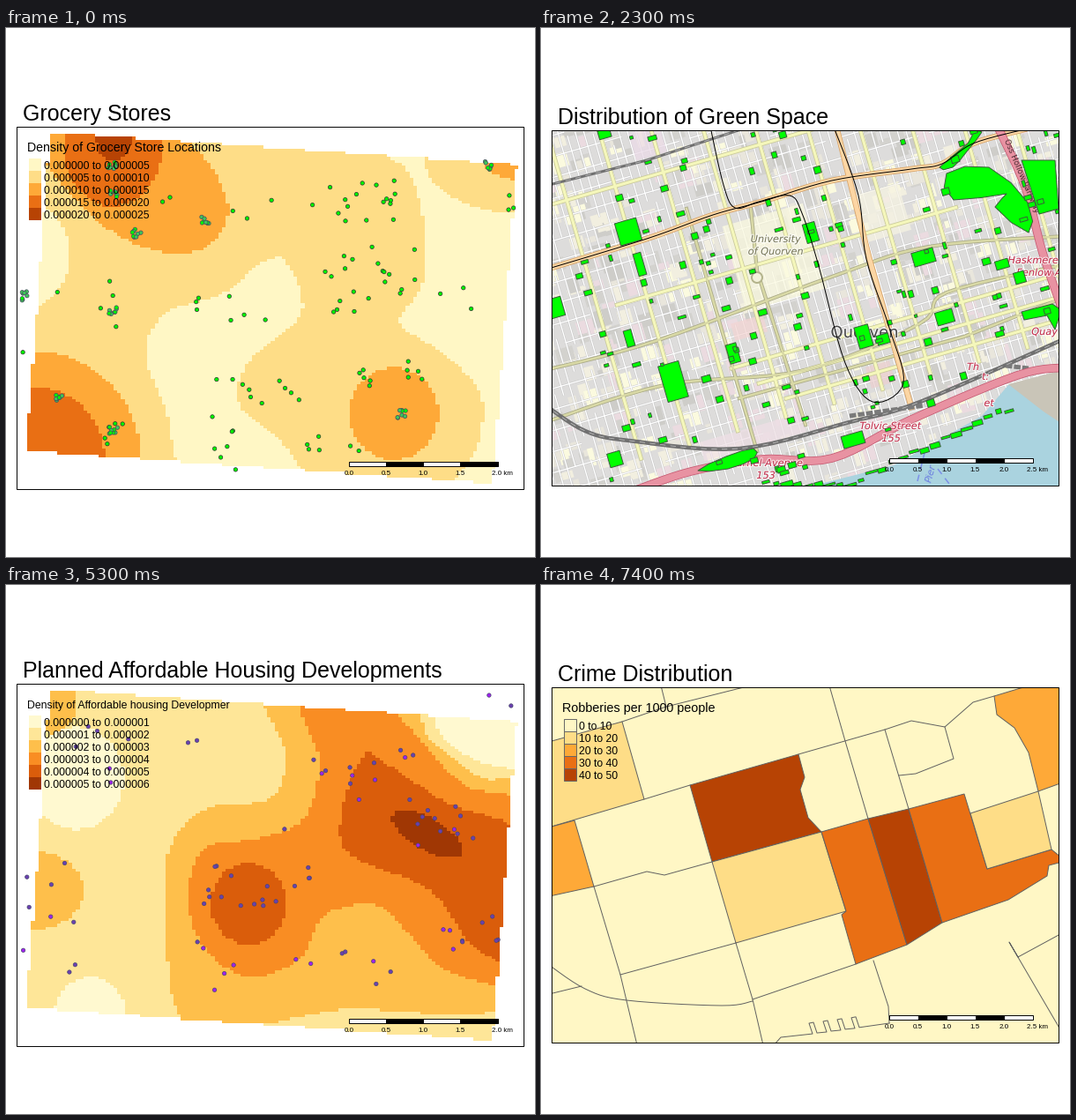
A matplotlib script that plays this animation: 600 px wide and 600 px high, repeating every 8000 ms.

```python
import math
import numpy as np
import matplotlib.pyplot as plt
import matplotlib.patheffects as pe
from matplotlib.animation import FuncAnimation
from matplotlib.collections import LineCollection, PolyCollection
from matplotlib.colors import ListedColormap
from matplotlib.path import Path

SIZE, PT, HAIR = 600, 0.72, 0.7  # stage in pixels, points per pixel, thin line
LEFT, RIGHT = 12, 587
COS, SIN = math.cos(0.28), math.sin(0.28)  # tilt of the street grid
SANS, LABEL = "Liberation Sans", "DejaVu Sans"
WARM5 = ["#FFF7C5", "#FEDD87", "#FEA938", "#E96F14", "#B74304"]
WARM6 = ["#FFF9D0", "#FEE698", "#FEBF4B", "#F98D23", "#DA5D0B", "#A03704"]

fig = plt.figure(figsize=(6, 6), dpi=100, facecolor="white")
scenes = []


def pts(*nums):
    return np.array(nums, float).reshape(-1, 2)


def spline(*nums, closed=True, n=8):
    """Catmull-Rom curve through the points."""
    p = pts(*nums)
    p = np.vstack([p[-1:], p, p[:2]] if closed else [p[:1], p, p[-1:]])
    a, b, c, d = p[:-3], p[1:-2], p[2:-1], p[3:]
    t = np.linspace(0, 1, n)[:, None, None]
    q = 2 * b + (c - a) * t + (2 * a - 5 * b + 4 * c - d) * t**2 + (3 * b - a - 3 * c + d) * t**3
    return q.transpose(1, 0, 2).reshape(-1, 2) / 2


def ellipse(x, y, rx, ry, turn=0):
    a = np.linspace(0, 2 * math.pi, 60)
    u, v = rx * np.cos(a), ry * np.sin(a)
    c, s = math.cos(turn), math.sin(turn)
    return np.column_stack([x + u * c - v * s, y + u * s + v * c])


def text(ax, x, y, s, size, **kw):
    kw = {"family": SANS, "color": "black", "va": "baseline", "clip_on": True, "zorder": 20, **kw}
    ax.text(x, y, s, fontsize=size * PT, **kw)


def panel(title, top, bottom):
    """Title, black frame, and a clipped map area measured in stage pixels."""
    page = fig.add_axes([0, 0, 1, 1], zorder=2)
    area = fig.add_axes([LEFT / SIZE, 1 - (bottom + 1) / SIZE,
                         (RIGHT - LEFT + 1) / SIZE, (bottom - top + 1) / SIZE], zorder=1)
    page.set(xlim=(0, SIZE), ylim=(SIZE, 0))
    area.set(xlim=(LEFT, RIGHT + 1), ylim=(bottom + 1, top))
    for ax in (page, area):
        ax.axis("off")
    page.add_patch(plt.Rectangle((LEFT, top), RIGHT - LEFT, bottom - top,
                                 fill=False, lw=HAIR, ec="black"))
    text(page, 19, top - 7, title, 25)
    scenes.append((page, area))
    return area


def legend(ax, title, size, top, colors, labels, edge="none"):
    text(ax, 24, top - 8, title, size)
    for i, (color, label) in enumerate(zip(colors, labels)):
        y = top + 14 * i
        ax.add_patch(plt.Rectangle((26, y), 14, 14, fc=color, ec=edge, lw=HAIR, zorder=19))
        text(ax, 43, y + 12.5, label, 12.3)


def scale_bar(ax, x0, y, parts):
    step = (557.5 - x0) / parts
    for i in range(parts):
        ax.add_patch(plt.Rectangle((x0 + i * step, y), step, 5, lw=HAIR, ec="black",
                                   fc="black" if i % 2 else "white", zorder=19))
        text(ax, x0 + i * step, y + 15, f"{i / 2:.1f}", 8, ha="center")
    text(ax, 551, y + 15, f"{parts / 2:.1f} km", 8)


def density(ax, colors, zones):
    """Blocky raster: zones of (class, outline) painted over class 1."""
    dx, dy, nx, ny = 4.25, 3.3, 131, 121
    gx, gy = np.meshgrid(24 + dx * (np.arange(nx) + 0.5), 121 + dy * (np.arange(ny) + 0.5))
    cells = np.column_stack([gx.ravel(), gy.ravel()])
    grid = np.ones(len(cells))
    for level, outline in zones:
        grid[Path(outline).contains_points(cells)] = level
    extent = Path(pts(50, 119, 579, 156, 552, 517, 23, 480))
    grid[~extent.contains_points(cells)] = np.nan
    ax.imshow(grid.reshape(ny, nx), cmap=ListedColormap(colors), vmin=-0.5,
              vmax=len(colors) - 0.5, interpolation="nearest", aspect="auto",
              extent=(24, 24 + dx * nx, 121 + dy * ny, 121))


def dots(ax, rng, groups, colors, edge):
    """Random dots in groups of (x, y, half width, half height, count)."""
    for x, y, w, h, n in groups:
        p = rng.uniform(-1, 1, (n, 2)) * (w, h) + (x, y)
        ax.scatter(*p.T, s=(4.4 * PT) ** 2, c=rng.choice(colors, n), ec=edge,
                   lw=0.7 * PT, zorder=15)


def bins(count, step):
    return [f"{i * step / 1e6:.6f} to {(i + 1) * step / 1e6:.6f}" for i in range(count)]


def grocery():
    ax = panel("Grocery Stores", 112, 523)
    density(ax, WARM5, [
        (0, ellipse(15, 258, 57, 64)),
        (0, spline(318, 266, 335, 325, 276, 378, 265, 428, 318, 476, 330, 520, 212, 520,
                   180, 430, 158, 370, 181, 324, 245, 302, 290, 267)),
        (0, spline(424, 130, 458, 166, 474, 225, 472, 290, 446, 334, 482, 361, 536, 410,
                   536, 470, 508, 530, 600, 540, 600, 130)),
        (1, ellipse(580, 145, 107, 66)),
        (2, ellipse(590, 150, 50, 24)),
        (2, spline(40, 130, 95, 212, 165, 252, 225, 250, 252, 207, 222, 145, 150, 100)),
        (3, ellipse(121, 136, 56, 67)),
        (4, ellipse(122, 126, 20, 26)),
        (2, ellipse(30, 490, 123, 123)),
        (3, ellipse(30, 490, 82, 83)),
        (2, ellipse(439.5, 438, 51, 52)),
    ])
    rng = np.random.default_rng(4)
    dots(ax, rng, [
        (385, 195, 58, 26, 17), (395, 285, 42, 40, 17), (490, 285, 50, 40, 7),
        (574, 190, 12, 60, 3), (255, 326, 45, 28, 7), (290, 408, 52, 22, 10),
        (235, 468, 32, 35, 7), (375, 462, 38, 18, 6), (425, 392, 55, 16, 10),
        (240, 180, 65, 48, 5), (70, 340, 55, 55, 6), (110, 460, 28, 15, 5),
    ], ["#00FF00"], "#303030")
    hubs = [(120, 155), (121, 187), (148, 233), (226, 217), (546, 156), (19, 304),
            (121, 322), (61, 419), (122, 455), (449, 438)]
    dots(ax, rng, [(x, y, 5, 5, 8) for x, y in hubs], ["#00FF00", "#3CC85A"], "#4A4A60")
    legend(ax, "Density of Grocery Store Locations", 14.1, 148, WARM5, bins(5, 5))
    scale_bar(ax, 389, 492, 4)


def housing():
    ax = panel("Planned Affordable Housing Developments", 112, 523)
    density(ax, WARM6, [
        (0, ellipse(80, 220, 54, 58)),
        (0, ellipse(95, 490, 41, 45)),
        (0, ellipse(590, 145, 105, 65)),
        (2, ellipse(50, 135, 31, 34)),
        (2, ellipse(33, 347, 55, 44)),
        (2, spline(298, 120, 318, 195, 298, 243, 230, 253, 190, 290, 182, 350, 207, 500,
                   380, 482, 585, 466, 595, 240, 540, 220, 480, 175, 450, 130)),
        (3, spline(334, 126, 355, 200, 338, 266, 285, 288, 225, 300, 206, 355, 225, 412,
                   275, 445, 334, 424, 361, 375, 420, 364, 460, 400, 505, 440, 590, 440,
                   595, 260, 515, 225, 426, 135)),
        (4, ellipse(275, 362, 43, 46)),
        (4, spline(405, 195, 380, 262, 392, 308, 480, 346, 530, 410, 590, 425, 590, 290,
                   500, 248, 430, 203)),
        (5, ellipse(478, 283, 45, 18, 0.52)),
    ])
    dots(ax, np.random.default_rng(8), [
        (150, 185, 90, 40, 8), (405, 225, 58, 42, 13), (500, 280, 38, 35, 11),
        (522, 395, 38, 32, 9), (265, 350, 42, 32, 13), (355, 310, 45, 35, 5),
        (290, 430, 95, 36, 9), (50, 375, 36, 72, 9), (430, 440, 15, 15, 3), (562, 133, 16, 9, 2),
    ], ["#A020F0", "#6A3FB0", "#6A3FB0"], "#4A4A70")
    legend(ax, "Density of Affordable housing Developmer", 12.3, 148, WARM6, bins(6, 1))
    scale_bar(ax, 389, 492, 4)


def crime():
    ax = panel("Crime Distribution", 116, 519)
    ax.add_patch(plt.Rectangle((0, 100), 600, 440, fc=WARM5[0]))
    for level, p in [
        (1, pts(5, 179, 92, 155, 117, 243, 5, 276)),
        (4, pts(169, 227, 292, 192, 299, 218, 294, 232, 303, 264, 318, 280, 194, 314)),
        (2, pts(5, 276, 38, 267, 60, 342, 5, 354)),
        (1, pts(194, 314, 318, 280, 346, 370, 221, 406)),
        (3, pts(318, 280, 371, 265, 415, 408, 357, 430, 341, 374, 346, 370)),
        (4, pts(371, 265, 417, 254, 455, 383, 415, 408)),
        (3, pts(417, 254, 480, 237, 506, 322, 579, 300, 595, 313, 576, 318, 574, 330, 530, 357, 455, 383)),
        (1, pts(487, 259, 564, 234, 579, 300, 506, 322)),
        (2, pts(514, 126, 517, 147, 537, 162, 553, 190, 564, 234, 600, 221, 600, 100)),
    ]:
        ax.add_patch(plt.Polygon(p, fc=WARM5[level], ec="#606060", lw=HAIR))
    piers = [(x + dx, 514 - (x - 270) * 0.13 - dy)
             for x in range(308, 365, 16) for dx, dy in ((0, 0), (-4, 12), (1, 13), (5, 1))]
    for p in [
        pts(92, 155, 142, 138, 230, 116), pts(136, 114, 142, 138),
        pts(327, 114, 345, 177, 371, 265),
        pts(292, 192, 390, 164, 420, 154, 458, 161, 490, 133, 514, 126),
        pts(390, 164, 417, 254), pts(458, 161, 468, 197, 425, 214, 406, 216),
        pts(117, 243, 169, 227), pts(60, 342, 90, 442, 109, 522),
        pts(60, 342, 120, 325, 140, 329, 194, 314), pts(90, 442, 221, 406),
        pts(221, 406, 240, 470, 252, 522), pts(240, 470, 357, 430),
        spline(5, 428, 50, 458, 97, 471, 205, 477, 240, 472, closed=False),
        pts(5, 465, 46, 455), pts(377, 426, 394, 478, 395, 497),
        np.array([(264, 522), (272, 513), *piers, (395, 497)]),
        pts(600, 390, 541, 422, 531, 405, 600, 523),
    ]:
        ax.plot(*p.T, color="#606060", lw=HAIR)
    labels = [f"{i} to {i + 10}" for i in range(0, 50, 10)]
    legend(ax, "Robberies per 1000 people", 14.4, 152, WARM5, labels, "#666666")
    scale_bar(ax, 395, 488, 5)


def tilt(u, v):
    """Street-grid coordinates to stage pixels."""
    return 12 + u * COS + v * SIN, 273 - u * SIN + v * COS


def block(x, y, w, h):
    """Rectangle centred on a stage pixel and turned with the streets."""
    return [(x + a * w * COS + b * h * SIN, y - a * w * SIN + b * h * COS)
            for a, b in ((-.5, -.5), (.5, -.5), (.5, .5), (-.5, .5))]


def road(ax, p, color, width, casing=None, z=4, **kw):
    if casing:
        ax.plot(*p.T, color=casing, lw=(width + 1.6) * PT, zorder=z, **kw)
    ax.plot(*p.T, color=color, lw=width * PT, zorder=z + 0.1, **kw)


def broken(rng, start, end, low, high):
    """Random street stretches between two limits, with gaps."""
    while start < end:
        stop = start + rng.uniform(low, high)
        yield start, stop
        start = stop + rng.choice([0, 12, 28])


def streets(ax, rng):
    tints = ["#E9E6DC", "#F2EFE0", "#D3D2CE", "#CECDC9", "#EBDBE0", "#FBFADF"]
    yards = [block(*rng.uniform((0, 100), (600, 530)), *rng.uniform(6, 22, 2)) for _ in range(650)]
    ax.add_collection(PolyCollection(yards, fc=rng.choice(tints, 650), ec="none", zorder=1))
    lines = [[tilt(u, a), tilt(u, b)] for u in np.arange(-150, 700, 9.5)
             for a, b in broken(rng, -260, 460, 30, 130)]
    lines += [[tilt(a, v), tilt(b, v)] for v in np.arange(-260, 460, 23)
              for a, b in broken(rng, -150, 700, 40, 150)]
    ax.add_collection(LineCollection(lines, colors="#C2C2C2", lw=2.2 * PT, zorder=2))
    ax.add_collection(LineCollection(lines, colors="white", lw=1.4 * PT, zorder=2.1))
    for u in range(38, 560, 57):
        road(ax, np.array([tilt(u, -180), tilt(u, 235)]), "#F5F7BB", 3.2, "#C9C99A")
    for v in (-70, 60, 165, 190, 215):
        road(ax, np.array([tilt(v, v), tilt(v + 400, v)]), "#F5F7BB", 3.2, "#C9C99A")


def parks(ax, rng):
    shapes = [
        spline(460, 165, 508, 158, 552, 198, 553, 232, 515, 203, 528, 188, 468, 195, n=3),
        pts(545, 150, 583, 150, 587, 205, 565, 211),
        spline(452, 158, 484, 131, 490, 119, 500, 118, 483, 140, 467, 158, n=3),
        spline(178, 502, 210, 486, 241, 477, 242, 488, 212, 500, n=3),
        pts(545, 322, 580, 313, 590, 320, 583, 342, 574, 326, 548, 331),
    ]
    shapes += [block(*p) for p in [
        (99, 231, 25, 26), (112, 268, 9, 26), (150, 401, 24, 42), (366, 350, 16, 25),
        (306, 232, 14, 22), (434, 260, 25, 16), (17, 317, 16, 22), (458, 328, 20, 15),
        (218, 369, 12, 22), (100, 352, 9, 19), (354, 467, 25, 14), (84, 489, 15, 16),
        (72, 120, 14, 10), (543, 283, 12, 13), (523, 268, 15, 10), (388, 353, 14, 11)]]
    while len(shapes) < 165:
        x, y = rng.uniform((12, 116), (588, 515))
        if y < 515 - max(x - 260, 0) * 0.42 and (x < 500 or y < 350):
            shapes.append(block(x, y, rng.uniform(3, 10), rng.uniform(3, 8)))
    for x in range(255, 535, 12):
        y = 517 - max(x - 350, 0) * 0.47 + rng.uniform(-3, 3)
        shapes.append(block(x, y, rng.uniform(5, 14), rng.uniform(2, 6)))
    ax.add_collection(PolyCollection(shapes, fc="#00FF00", ec="#3A5A3A", lw=HAIR, zorder=10))


def labels(ax):
    halo = [pe.withStroke(linewidth=1.6, foreground="#FFFFFFC0")]
    kw = dict(family=LABEL, zorder=8, ha="center")
    text(ax, 367, 351, "Quorven", 18, color="#4A4A4A", path_effects=halo, **kw)
    for x, y, s in [(266, 243, "University"), (266, 257, "of Quorven")]:
        text(ax, x, y, s, 11.3, color="#7B7B5C", style="italic", path_effects=halo, **kw)
    for x, y, s in [
        (396, 455, "Tolvic Street"), (397, 469, "155"), (259, 497, "urnel Avenue"),
        (255, 511, "153"), (558, 267, "Haskmere"), (565, 281, "Fenlow A"), (571, 348, "Quay"),
        (490, 388, "Th"), (504, 399, "t:"), (508, 429, "et"),
    ]:
        text(ax, x, y, s, 11.3, color="#C22F4C", style="italic", path_effects=halo, **kw)
    kw["va"] = "center"
    text(ax, 545, 168, "Oss Hollow Parkway", 9, color="#4A2A32", rotation=-67, **kw)
    text(ax, 443, 505, "Pier", 11, color="#6C7FE0", style="italic", rotation=75, **kw)


def green_space():
    ax = panel("Distribution of Green Space", 116, 519)
    rng = np.random.default_rng(11)
    ax.add_patch(plt.Rectangle((0, 100), 600, 440, fc="#DDDCDB"))
    streets(ax, rng)
    for spot, color in [((265, 260, 95, 100), "#FBFAE0"), ((386, 210, 55, 55), "#F6F3E3"),
                        ((236, 340, 38, 20), "#F3D5D3"), ((385, 393, 28, 25), "#EBCFCF"),
                        ((240, 464, 120, 22), "#EFE0E6"), ((121, 130, 36, 32), "#EBDBE8")]:
        ax.add_patch(plt.Polygon(block(*spot), fc=color, alpha=0.75, zorder=2.5))
    ax.add_patch(plt.Polygon(pts(285, 525, 400, 496, 500, 440, 530, 405, 600, 388, 600, 530),
                             fc="#AAD3DF", zorder=3))
    ax.add_patch(plt.Polygon(pts(530, 404, 600, 386, 600, 455, 570, 435), fc="#C9C5B8", zorder=3.1))

    for p in [
        pts(165, 205, 245, 480), pts(238, 205, 245, 275, 300, 450),
        spline(5, 388, 130, 355, 330, 282, 440, 248, 595, 236, closed=False),
        spline(5, 447, 140, 405, 300, 388, 430, 335, 460, 300, 595, 268, closed=False),
        pts(225, 420, 480, 350, 595, 305),
    ]:
        road(ax, p, "#D9D9A6", 2.6, "#A9A987")
    ax.add_patch(plt.Circle((245, 283), 6, fc="#F3F1DA", ec="#B4B48C", lw=2 * PT, zorder=5))

    bloor = spline(5, 274, 120, 239, 195, 212, 250, 197, 330, 173, 420, 160, 455, 154, 490, 131,
                   548, 115, closed=False)
    road(ax, bloor, "#FCD6A4", 5, "#D9A468", 5)
    road(ax, pts(335, 112, 372, 260, 420, 430), "#FCD6A4", 5, "#D9A468", 5)
    rail = spline(5, 428, 50, 457, 100, 468, 225, 477, 350, 447, 430, 424, 595, 352, closed=False)
    for p, w in ((rail, 4.5), (pts(5, 179, 120, 150, 230, 114), 3)):
        road(ax, p, "#707070", w, z=5.5)
        ax.plot(*p.T, color="#B8B8B8", lw=0.9 * PT, ls=(0, (7, 6)), zorder=5.8)
    for p in (pts(350, 440, 435, 428), pts(527, 383, 553, 386)):
        road(ax, p, "#7A7A7A", 5, z=5.5, ls=(0, (1.5, 0.4)))
    for p in [
        spline(105, 525, 170, 503, 250, 489, 330, 488, 420, 444, 540, 394, 595, 385, closed=False),
        spline(518, 112, 549, 180, 569, 255, 595, 330, closed=False),
    ]:
        road(ax, p, "#E892A2", 8, "#C75A72", 6)
    for p in (pts(427, 514, 436, 478), pts(450, 500, 463, 517)):
        ax.plot(*p.T, color="#7C8FE8", lw=1.5 * PT, ls=(0, (5, 4)), zorder=8)
    labels(ax)
    parks(ax, rng)

    subway = spline(192, 112, 207, 178, 220, 204, 247, 197, 282, 190, 296, 210, 315, 270, 345, 380,
                    376, 424, 411, 403, 395, 340, 369, 262, 360, 190, 332, 112, closed=False)
    for p in (bloor, subway):
        ax.plot(*p.T, color="black", lw=PT, zorder=12)
    scale_bar(ax, 395, 488, 5)


for build in (grocery, green_space, housing, crime):
    build()

STEP = 500
CUTS = (500, 3500, 6500)


def update(i):
    now = sum(i * STEP >= cut for cut in CUTS)
    for k, axes in enumerate(scenes):
        for ax in axes:
            ax.set_visible(k == now)


anim = FuncAnimation(fig, update, frames=16, interval=STEP, repeat=True, repeat_delay=0, blit=False)
plt.show()
```
